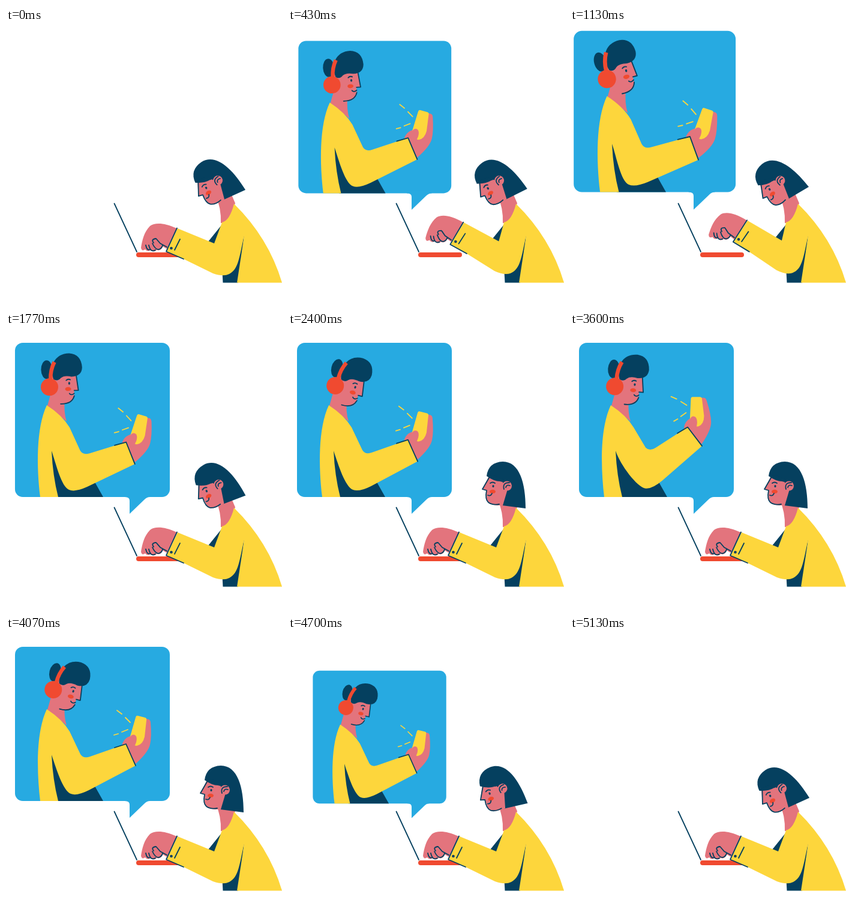
An HTML page that plays this animation: 460x460 px, repeating every 5430 ms.

```html
<!DOCTYPE html>
<html lang="en">
<head>
<meta charset="utf-8">
<title>Video call</title>
<style>
  html, body { margin: 0; width: 100%; height: 100%; overflow: hidden; background: #fff; }
  svg { display: block; width: 100%; height: 100%; }
  .blue { fill: #27aae1; }
  .yellow { fill: #fdd63c; }
  .navy { fill: #05405f; }
  .pink { fill: #e3747d; }
  .red { fill: #f04a30; }
  .line, .rays, .band { fill: none; stroke: #05405f; stroke-width: 1.8; stroke-linecap: round; stroke-linejoin: round; }
  .rays { stroke: #fdd63c; }
  .band { stroke: #f04a30; stroke-width: 6.5; stroke-linecap: butt; }
</style>
</head>
<body>
<svg viewBox="0 0 460 460">
  <g id="bubble">
    <rect class="blue" x="15" y="18" width="258" height="257" rx="13"/>
    <path class="blue" d="M198 275Q206 275 206 281V303L231 279Q235 275 240 275V270H198Z"/>
    <path class="pink" d="M76 98L69 123L101 149Q96 134 98 112Z"/>
    <path class="navy" d="M75 195Q77 240 84 275H162L140 236L105 215Z"/>
    <g id="phoneHand">
      <path class="pink" d="M230 138Q241 137 241 144Q243 168 240 181Q237 194 216 213L199 181Q214 165 230 138Z"/>
      <path class="pink" d="M193 183Q196 169 210 166L206 184Z"/>
      <path class="yellow" d="M220 133L232 136Q235 137 234 141L231 168Q228 181 218 183L203 181L216 136Q217 132 220 133Z"/>
      <path class="pink" d="M202 182L206 169Q211 162 216 166Q219 169 217 177L213 187Z"/>
      <path class="rays" d="M185 124L193 130M199 136L207 144M180 165L187 163M193 160L203 156"/>
    </g>
    <path id="manBody" class="yellow"/>
    <path id="manCuff" class="line" d="M181 186L200 180L216 216"/>
    <g id="manHead">
      <path class="pink" d="M78 68L117 68L121 98L114 99V107Q112 120 97 120L76 112Z"/>
      <ellipse class="navy" cx="69" cy="62.5" rx="9.5" ry="15.5"/>
      <path class="navy" d="M80 79Q74 62 81 50Q89 36 107 36Q127 38 128 60Q127 75 110 75Q98 72 92 77Q87 83 80 79Z"/>
      <path class="band" d="M75 79Q75 63 82 50"/>
      <circle class="red" cx="73" cy="91.5" r="14.5"/>
      <ellipse class="red" cx="104" cy="95.5" rx="5" ry="3.3"/>
      <path class="line" d="M118 74L121 98H114M114 107Q110 121 91 120M101 81Q104 78 108 80M106 103Q109 107 114 103"/>
      <ellipse class="navy" cx="106" cy="86" rx="1.6" ry="2.2"/>
    </g>
  </g>

  <path class="line" d="M180.5 292.5L218 373"/>
  <rect class="red" x="217" y="374" width="73" height="8" rx="4"/>
  <path class="pink" d="M349 278Q359 300 358 325H372L382 292L376 278Z"/>
  <path class="navy" d="M362 325L337 356L352 366ZM397 346L387 424.5H361.5L360 398Z"/>
  <g id="typingHand">
    <path class="pink" d="M285 334C263 324 248 324 240 330C230 340 227 354 225 366Q226 373 232 369Q236 374 241 370Q246 375 251 370Q259 372 261 364L268 368Z"/>
    <path class="line" d="M233 362Q235 372 241 369M238 362Q241 375 249 370M246 358Q241 352 250 351M244 359Q249 370 255 369Q260 367 261 362M251 352L257 359L268 365"/>
  </g>
  <path id="womanBody" class="yellow"/>
  <g id="womanCuff">
    <path class="line" d="M285 333.5L267 372.5L296 385M290 352L281 370"/>
    <circle class="navy" cx="275.5" cy="367" r="2.3"/>
  </g>
  <g id="womanHead">
    <path class="navy" d="M331 240Q334 217 358 216C386 216 396 252 396 294L357 289L350 245Z"/>
    <path class="pink" d="M335 240L356 248L366 262L358 289Q334 290 331 280V264L324 262Z"/>
    <circle class="pink" cx="365" cy="256.5" r="8"/>
    <path class="navy" d="M331 240Q345 236 361 247Q357 251 354 249Q343 249 331 240Z"/>
    <ellipse class="red" cx="341" cy="266" rx="5" ry="3.3"/>
    <path class="line" d="M335 243L324 262L331 264Q328 279 334 284Q341 289 352 287M337 252Q341 249 345 252M333 272Q338 274 340 269M360 262Q357 251 369 251M363 259Q364 254 370 256"/>
    <ellipse class="navy" cx="342" cy="257" rx="1.6" ry="2.1"/>
  </g>
</svg>
<script>
const LOOP = 5430;
const el = Object.fromEntries([...document.querySelectorAll('[id]')].map(e => [e.id, e]));

const progress = (t, start, end) => Math.min(1, Math.max(0, (t - start) / (end - start)));
const ease = (t, start, end) => {
  const u = progress(t, start, end);
  return u * u * (3 - 2 * u);
};

// Pops past full size, settles back, and later drops to nothing.
function bubbleSize(t) {
  const pop = 1.07 * (1 - (1 - progress(t, 100, 700)) ** 3.2);
  const shrink = 1 - progress(t, 4200, 5130) ** 3.2;
  return (pop - .07 * ease(t, 700, 1800)) * shrink;
}

// Returns a function that turns a point about (cx, cy).
function turner(angle, cx, cy) {
  const a = angle * Math.PI / 180, c = Math.cos(a), s = Math.sin(a);
  return (x, y) => `${cx + (x - cx) * c - (y - cy) * s} ${cy + (x - cx) * s + (y - cy) * c}`;
}

const rotate = (angle, x, y, ...parts) =>
  parts.forEach(p => p.setAttribute('transform', `rotate(${angle} ${x} ${y})`));

function drawMan(t) {
  const leanBack = ease(t, 100, 1130);
  const nod = ease(t, 1300, 2300);
  const raise = ease(t, 2360, 3000) - ease(t, 3350, 4050);
  const armAngle = 4 * (leanBack - nod) - 19 * raise;
  const p = turner(armAngle, 107, 186);

  rotate(28 * nod - 14 * (leanBack + raise), 84, 114, el.manHead);
  rotate(armAngle, 107, 186, el.phoneHand, el.manCuff);
  el.manBody.setAttribute('d', `M68 122Q94 139 106 159L${p(124, 197)}Q${p(129, 205)} ${p(140, 201)}
    L${p(200, 180)}L${p(216, 216)}L${p(138, 257)}Q${p(118, 267)} ${p(108, 263)}
    C${p(95, 258)} 84 222 76 198Q78 240 87 275H57C51 225 50 160 68 122Z`);
}

function drawWoman(t) {
  const armAngle = 8 * (ease(t, 100, 600) - ease(t, 1180, 1790));
  const bow = 31.5 + 6.5 * ease(t, 100, 900);
  const headAngle = -bow * (1 - ease(t, 1450, 2400)) - 31.5 * ease(t, 4080, 5130);
  const p = turner(armAngle, 384, 399);

  rotate(headAngle, 354.6, 276.5, el.womanHead);
  rotate(armAngle, 384, 399, el.typingHand, el.womanCuff);
  el.womanBody.setAttribute('d', `M380 293Q438 350 460 424.5H385L397 346C389 380 388 402 ${p(372, 410)}
    Q${p(362, 415)} ${p(345, 409)}L${p(296, 385)}L${p(268, 372)}L${p(286, 334)}L${p(347, 359)}
    L360 324Q373 321 380 293Z`);
}

function draw(t) {
  const size = bubbleSize(t);
  el.bubble.setAttribute('visibility', size > 0 ? 'visible' : 'hidden');
  el.bubble.setAttribute('transform', `translate(206 306) scale(${size}) translate(-206 -306)`);
  drawMan(t);
  drawWoman(t);
}

function frame() {
  draw(performance.now() % LOOP);
  requestAnimationFrame(frame);
}
frame();
</script>
</body>
</html>
```
